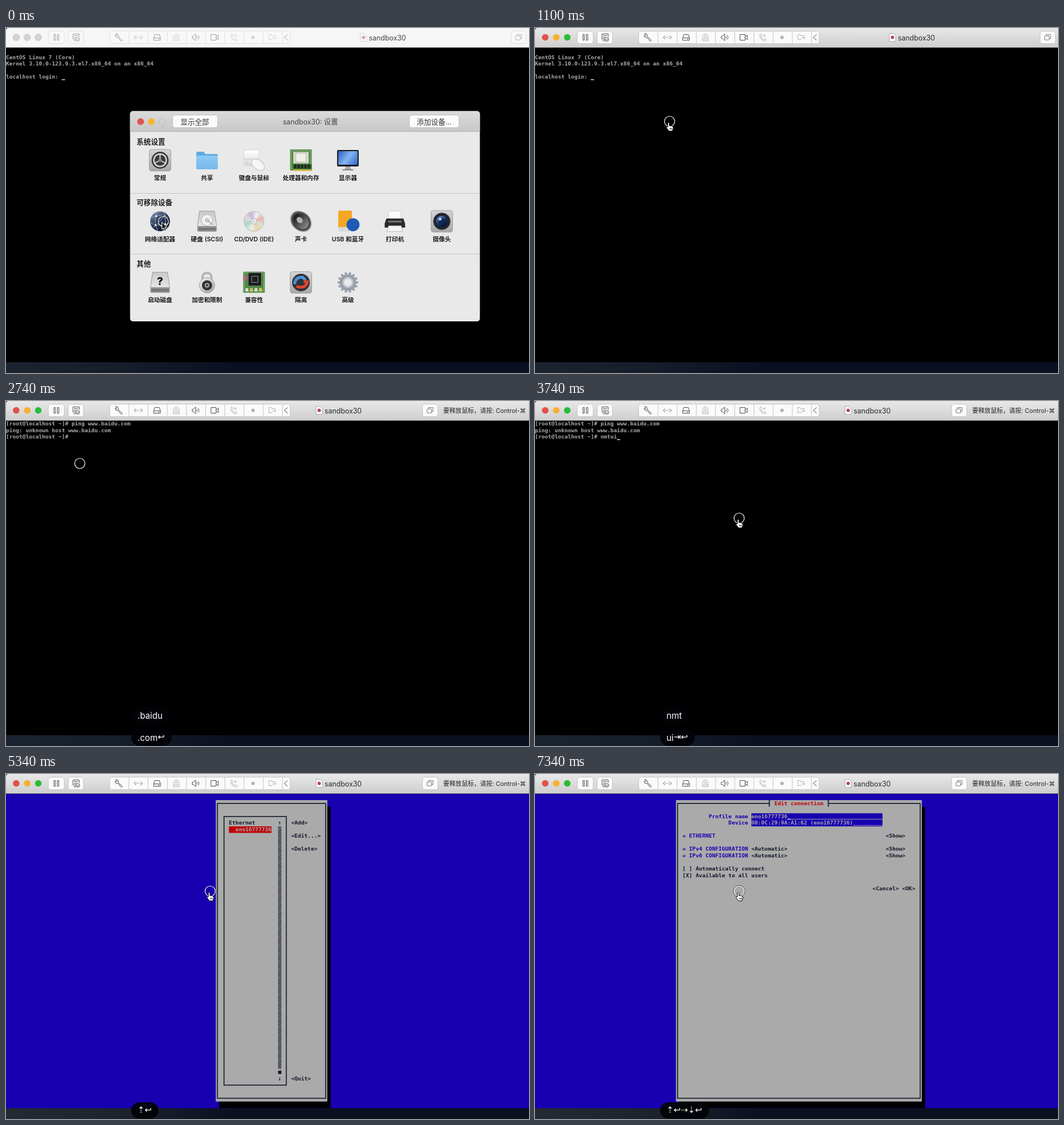
Animation of 921x608 px, one loop 8 s. Source, as an HTML page with a canvas:

```html
<!DOCTYPE html>
<html lang="zh-CN">
<head>
<meta charset="utf-8">
<style>
html, body { margin: 0; width: 100%; height: 100%; overflow: hidden; background: #000; }
canvas { display: block; }
</style>
</head>
<body>
<canvas id="stage" width="921" height="608"></canvas>
<script>
const g = document.getElementById('stage').getContext('2d');
const LOOP = 8000, CW = 5.773, CH = 11.547, TOP = 34.5;
const GRAY = '#aaa', BLUE = '#1800b0', RED = '#c00008', INK = '#101828';
const SANS = 'Inter, "Noto Sans CJK SC", "Noto Sans CJK JP", "DejaVu Sans", sans-serif';
const MONO = 'bold 9.589px "DejaVu Sans Mono", monospace';
const HOST = 'sandbox30', PROMPT = '[root@localhost ~]# ';

// ---- drawing helpers ----
function rect(x, y, w, h, fill, r = 0, line) {
  g.beginPath();
  g.roundRect(x, y, w, h, r);
  if (fill) { g.fillStyle = fill; g.fill(); }
  if (line) { g.strokeStyle = line; g.lineWidth = 1; g.stroke(); }
}
function disc(x, y, r, fill, line, width = 1) {
  g.beginPath();
  g.arc(x, y, r, 0, 7);
  if (fill) { g.fillStyle = fill; g.fill(); }
  if (line) { g.strokeStyle = line; g.lineWidth = width; g.stroke(); }
}
function path(d, fill, line, width = 1) {
  const p = new Path2D(d);
  if (fill) { g.fillStyle = fill; g.fill(p); }
  if (line) { g.strokeStyle = line; g.lineWidth = width; g.stroke(p); }
}
function text(s, x, y, size, color, align = 'left', weight = 400) {
  g.font = `${weight} ${size}px ${SANS}`;
  g.textAlign = align;
  g.textBaseline = 'alphabetic';
  g.fillStyle = color;
  g.fillText(s, x, y);
}
function ramp(x0, y0, x1, y1, ...colors) {
  const r = g.createLinearGradient(x0, y0, x1, y1);
  colors.forEach((c, i) => r.addColorStop(i / (colors.length - 1), c));
  return r;
}
function at(x, y, draw) {
  g.save();
  g.translate(x, y);
  draw();
  g.restore();
}

// ---- main window ----
const toolIcons = [
  [199, 'M-7-5L-4-7-1-4-1-1 6 5 4 7-2 0-5 0-7-3-4-3-3-5-5-7'],
  [233, 'M-4-3L-7 0-4 3M4-3L7 0 4 3M-3 0h1M-.5 0h1M2 0h1'],
  [266, 'M-6 1L-4-5H4L6 1V5H-6ZM-6 1H6M2 3h2'],
  [300, 'M-5 6V0A5 6 0 0 1 5 0V6ZM-5 3H5M-2-1A2 2 0 0 0 2-1A2 2 0 0 0-2-1', 1],
  [334, 'M-6-2H-4L0-6V6L-4 2H-6ZM2-2Q4 0 2 2M4-4Q8 0 4 4'],
  [367, 'M-6-5H3V5H-6ZM3-1L7-4V4L3 1'],
  [401, 'M-5-5L-3-6-1-3-3-1Q-1 3 2 4L4 2 6 5Q4 8 0 5-6 1-5-5M2-2L5-5M2-5V-2H5', 1],
  [435, '', 1],
  [469, 'M-6 4V-5H-2L-1-3H5V-1M-6 4H0M0 1H6L4-1M6 1L4 3', 1],
  [493, 'M3-5L-3 0 3 5']
];
function toolbar(active, captured) {
  rect(0, 0, 921, 34, active ? ramp(0, 0, 0, 34, '#e8e8e8', '#cecece') : '#f6f6f6');
  rect(0, 34, 921, 1, '#6b6b6b');
  path('M0 0H3L0 3Z', '#555');
  ['#e2504a', '#f5b02e', '#29bd36'].forEach((c, i) =>
    disc(18 + 19.4 * i, 16.5, 5.8, active ? c : '#d3d3d3', active ? null : '#c6c6c6'));
  const edge = active ? '#c4c4c4' : '#e0e0e0', face = active ? '#fafafa' : '#f8f8f8';
  const boxX = captured ? 733.5 : 889.5;
  for (const [x, w] of [[74.5, 28], [109.5, 27], [182.5, 318], [boxX, 27]]) rect(x, 5.5, w, 22, face, 4, edge);
  for (let i = 0; i < 9; i++) rect(216 + 33.8 * i, 6, 1, 21, edge);
  g.save();
  g.globalAlpha = active ? 1 : 0.5;
  const ink = '#4a4a4a', dim = '#b0b0b0';
  rect(84.5, 11.5, 2.5, 10, null, 0, ink);
  rect(90.5, 11.5, 2.5, 10, null, 0, ink);
  at(123, 16.5, () => {
    path('M6-1V-6H-5V3H0M-3-3H4M-3 0H1M-4 6H0', null, ink);
    disc(3.5, 3.5, 3.3, null, ink);
    path('M2 3.5L3.3 5 5 2.5', null, ink);
  });
  for (const [x, d, off] of toolIcons) at(x, 16.5, () => {
    if (d) path(d, null, off ? dim : ink);
    else disc(0, 0, 3, dim);
  });
  at(boxX + 13.5, 16.5, () => {
    rect(-5.5, -2.5, 8, 7, null, 1, '#777');
    path('M-3-3V-5H5V2H3', null, '#777');
  });
  const tx = captured ? 546 : 624;
  path(`M${tx} 9.5h7l4 4v10h-11z`, '#fff', '#999', 0.8);
  disc(tx + 5.5, 16.5, 3, '#b8435a');
  g.restore();
  text(HOST, tx + 15, 21.5, 12.4, active ? '#2c2c2c' : '#444');
  if (captured) text('要释放鼠标，请按: Control-⌘', 770, 20.5, 10.8, '#222');
}
function strip(light) {
  rect(0, 589, 921, 19, ramp(0, 589, 400, 608, light ? '#242a33' : '#1b2330', light ? '#1d232d' : '#161d2b', '#0a1020'));
}

// ---- console ----
function put(row, col, s, color = GRAY, back) {
  if (back) rect(col * CW, TOP + row * CH, s.length * CW, CH, back);
  g.font = MONO;
  g.textAlign = 'left';
  g.textBaseline = 'alphabetic';
  g.fillStyle = color;
  [...s].forEach((c, i) => {
    if (c !== ' ') g.fillText(c, (col + i) * CW, TOP + row * CH + 8.6);
  });
}
function caret(row, col) { rect(col * CW, TOP + row * CH + 9.6, CW, 1.6, '#ccc'); }

function frame(c0, r0, c1, r1) {
  const x = (c0 + .5) * CW, y = TOP + (r0 + .5) * CH;
  g.strokeStyle = INK;
  g.lineWidth = 1.6;
  g.strokeRect(x, y, (c1 - c0) * CW, (r1 - r0) * CH);
}
function dialog(c0, r0, c1, r1, title, col) {
  const w = (c1 - c0) * CW, h = (r1 - r0) * CH;
  rect((c0 + 1) * CW, TOP + (r0 + 1) * CH, w, h, '#000');
  rect(c0 * CW, TOP + r0 * CH, w, h, GRAY);
  frame(c0, r0, c1 - 1, r1 - 1);
  if (!title) return;
  const a = (col - 1.5) * CW, b = (col + title.length + 1.5) * CW, y = TOP + r0 * CH;
  rect(a, y, b - a, CH, GRAY);
  rect(a - 1, y, 1.8, CH, INK);
  rect(b - 1, y, 1.8, CH, INK);
  put(r0, col, title, RED);
}
function menuScreen() {
  dialog(67, 18, 94, 31, 'NetworkManager TUI', 71);
  put(20, 69, 'Please select an option', BLUE);
  put(22, 69, 'Edit a connection'.padEnd(23), GRAY, RED);
  put(23, 69, 'Activate a connection', INK);
  put(24, 69, 'Set system hostname', INK);
  put(26, 69, 'Quit', INK);
  put(28, 88, '<OK>', INK);
}
function listScreen(onEdit) {
  dialog(64, 1, 98, 47);
  frame(66, 3, 85, 44);
  put(4, 68, 'Ethernet', INK);
  put(5, 68, '  eno16777736', GRAY, onEdit ? BLUE : RED);
  put(4, 83, '↑', INK);
  put(42, 83, '■', INK);
  put(43, 83, '↓', INK);
  g.save();
  g.beginPath();
  g.rect(83 * CW, TOP + 5 * CH, CW, 37 * CH);
  g.clip();
  g.strokeStyle = INK;
  g.lineWidth = 1.1;
  g.beginPath();
  for (let y = 88; y < 530; y += 2.9) { g.moveTo(478, y + 6); g.lineTo(487, y - 3); }
  g.stroke();
  g.restore();
  put(4, 87, '<Add>', INK);
  put(6, 87, '<Edit...>', onEdit ? GRAY : INK, onEdit && RED);
  put(8, 87, '<Delete>', INK);
  put(43, 87, '<Quit>', INK);
}
function editScreen() {
  dialog(43, 1, 118, 47, 'Edit connection', 73);
  put(3, 53, 'Profile name', BLUE);
  put(4, 59, 'Device', BLUE);
  put(3, 66, 'eno16777736'.padEnd(40, '_'), GRAY, BLUE);
  put(4, 66, '00:0C:29:9A:A1:62 (eno16777736)'.padEnd(40, '_'), GRAY, BLUE);
  caret(3, 77);
  [[6, 'ETHERNET'], [8, 'IPv4 CONFIGURATION'], [9, 'IPv6 CONFIGURATION']].forEach(([row, s]) => {
    put(row, 45, '= ' + s, BLUE);
    put(row, 107, '<Show>', INK);
    if (row > 6) put(row, 66, '<Automatic>', INK);
  });
  put(11, 45, '[ ] Automatically connect', INK);
  put(12, 45, '[X] Available to all users', INK);
  put(14, 103, '<Cancel> <OK>', INK);
}
function loginScreen(t) {
  put(1, 0, 'CentOS Linux 7 (Core)');
  put(2, 0, 'Kernel 3.10.0-123.9.3.el7.x86_64 on an x86_64');
  const typed = 'root'.slice(0, t < 1400 ? 0 : t < 1550 ? 2 : t < 1690 ? 3 : 4);
  put(4, 0, 'localhost login: ' + typed);
  if (t < 1840) {
    if (!(t >= 500 && t < 650) && !(t >= 950 && t < 1100)) caret(4, 17 + typed.length);
    return;
  }
  put(5, 0, 'Password:');
  if (t < 2440) {
    if (t < 2140) caret(5, 10);
    return;
  }
  put(6, 0, 'Last login: Wed Mar 15 10:22:41 on tty1');
  put(7, 0, PROMPT + 'clear');
  caret(7, 25);
}
function shellScreen(t) {
  if (t < 2740) {
    put(0, 0, PROMPT);
    caret(0, 20);
    return;
  }
  put(0, 0, PROMPT + 'ping www.baidu.com');
  put(1, 0, 'ping: unknown host www.baidu.com');
  put(2, 0, PROMPT + (t < 3740 ? '' : 'nmtui'));
  if (t >= 3740) caret(2, 25);
}

// ---- settings window ----
function tile() { rect(-19, -19, 38, 38, ramp(0, -19, 0, 19, '#d4d4d4', '#a8a8a8'), 4, '#a0a0a0'); }
function drive() {
  path('M-13-18H13L17 9H-17Z', ramp(0, -18, 0, 9, '#c9c9c9', '#e6e6e6'), '#999');
  rect(-17, 9, 34, 9, '#8d8d8d', 2);
  for (let i = -14; i < 14; i += 3) rect(i, 12, 1.5, 3, '#555');
}
function gear(r, teeth, color) {
  g.strokeStyle = color;
  g.lineWidth = 4;
  g.beginPath();
  for (let i = 0; i < teeth; i++) {
    const a = i * 2 * Math.PI / teeth, c = Math.cos(a), s = Math.sin(a);
    g.moveTo(c * r, s * r);
    g.lineTo(c * (r + 4), s * (r + 4));
  }
  g.stroke();
  disc(0, 0, r - 2, null, color, 5);
}
function board() {
  rect(-19, -19, 38, 37, '#4c8a41', 1);
  rect(-17, -17, 34, 32, null, 0, '#8dbb78');
}
const icons = {
  常规() {
    tile();
    disc(0, 0, 15, '#3a3a3a');
    disc(0, 0, 11, null, '#d8d8d8', 2.5);
    path('M0 0V-10M0 0L9 5M0 0L-9 5', null, '#d8d8d8', 2);
    disc(0, 0, 3, '#888');
  },
  共享() {
    path('M-19-12Q-19-15-16-15H-6L-3-11H16Q19-11 19-8V14H-19Z', '#5fabe2');
    rect(-19, -8, 38, 24, ramp(0, -8, 0, 16, '#8fcaf4', '#73b9ec'), 2);
  },
  键盘与鼠标() {
    rect(-18, -18, 27, 28, ramp(0, -18, 0, 10, '#fff', '#d9d9d9'), 3, '#d4d4d4');
    path('M-15 2L-10 7M-10 2L-15 7M-17-2H8', null, '#c4c4c4');
    at(7, 8, () => {
      g.rotate(.65);
      g.beginPath();
      g.ellipse(0, 0, 13, 8, 0, 0, 7);
      g.fillStyle = '#f6f6f6';
      g.fill();
      g.strokeStyle = '#bbb';
      g.stroke();
    });
  },
  处理器和内存() {
    board();
    rect(-14, -15, 28, 21, '#d5dac9', 1, '#718068');
    rect(-9, -12, 18, 15, '#eef0e6', 1, '#b5bca8');
    rect(-14, 7, 33, 12, '#2e6d2c');
    for (let i = 0; i < 5; i++) rect(-12 + 6 * i, 8, 4, 6, '#222');
    rect(-14, 16, 33, 3, '#d3b44a');
  },
  显示器() {
    rect(-19, -18, 38, 29, '#15171b', 2);
    rect(-17, -16, 34, 24, ramp(-17, -16, 17, 8, '#2b5fc0', '#86b5f1', '#2f64c4'));
    path('M-4 11H4L6 17H-6Z', '#aaa');
    rect(-10, 16, 20, 2, '#888', 1);
  },
  网络适配器() {
    disc(0, 0, 17.5, ramp(-12, -15, 10, 17, '#7388a8', '#26324f', '#121a30'));
    path('M-14-7Q0-14 14-7M-17 3Q0 11 17 3M-5-16Q-13 0-4 16M6-16Q14 0 5 16M-12 11L11-12', null, '#92a3c0');
    for (const [x, y] of [[-7, -9], [8, -9], [-8, 7], [9, 5]]) disc(x, y, 1.6, '#fff');
  },
  '硬盘 (SCSI)'() {
    drive();
    disc(0, -2, 10, '#f0f0f0', '#b5b5b5');
    disc(0, -2, 3, '#d0d0d0', '#aaa');
    path('M2-1L10 6', null, '#aaa', 2);
  },
  'CD/DVD (IDE)'() {
    const c = g.createConicGradient(.4, 0, 0);
    ['#ddd', '#e7d7a0', '#eee', '#a8d6c8', '#ddd', '#c9b5dd', '#f2f2f2', '#e5b5a8', '#ddd']
      .forEach((v, i) => c.addColorStop(i / 8, v));
    disc(0, 0, 17.5, c, '#bbb');
    disc(0, 0, 5, '#eee', '#aaa');
    disc(0, 0, 2, '#ccc');
  },
  声卡() {
    g.rotate(.75);
    g.scale(1, .8);
    disc(0, 0, 20, '#4a4a4a', '#b0b0b0', 2);
    disc(0, 0, 15, ramp(-15, 0, 15, 0, '#181818', '#8a8a8a'));
    disc(-3, 0, 6, '#b0b0b0');
  },
  'USB 和蓝牙'() {
    rect(-17, -19, 24, 35, '#f5a623', 2);
    rect(-17, 10, 24, 8, '#d9d9d9', 1);
    disc(9, 6, 11.5, '#1d5bb5');
  },
  打印机() {
    rect(-11, -18, 22, 18, '#fafafa', 0, '#ccc');
    path('M-15-5H15L18 4V11H-18V4Z', '#2a2a2a');
    rect(-12, -1, 24, 3, '#777');
    path('M-11 8H11L14 18H-14Z', '#f4f4f4', '#bbb');
  },
  摄像头() {
    tile();
    disc(0, 0, 15, '#20242c', '#666');
    disc(0, 0, 10, ramp(-6, -9, 6, 9, '#5d8fd0', '#143063', '#0a1530'));
    disc(0, 0, 5, '#122650');
    disc(-3, -4, 2.5, '#b8d4f4');
  },
  启动磁盘() {
    drive();
    text('?', 0, 5, 19, '#111', 'center', 800);
  },
  加密和限制() {
    path('M-8 0V-9A8 8 0 0 1 8-9V0', null, '#b5b5b5', 4);
    disc(0, 5, 13.5, ramp(-10, -8, 10, 18, '#f2f2f2', '#a5a5a5'), '#999');
    disc(0, 5, 9, '#343434');
    disc(0, 5, 4, '#aaa');
    disc(0, 5, 2, '#333');
  },
  兼容性() {
    board();
    rect(-10, -17, 23, 23, '#1a1c1e', 1, '#777');
    rect(-4, -11, 11, 11, null, 0, '#999');
    rect(-18, -12, 5, 9, '#c75b87');
    for (let i = 0; i < 4; i++) rect(-15 + 8 * i, 10, 5, 6, i % 2 ? '#d9c267' : '#ddd');
  },
  隔离() {
    tile();
    disc(0, 0, 15.5, '#30343c');
    path('M-11 3Q-10-10 3-9L8-4', null, '#4b93d8', 5);
    path('M-8 7Q8 12 11-1L5-2', null, '#e0452f', 5);
  },
  高级() {
    gear(14, 14, '#979faa');
    disc(0, 0, 8, null, '#b8c0cc', 2);
  }
};
const sections = [['系统设置', 5], ['可移除设备', 7], ['其他', 5]];
function settings() {
  rect(218.5, 146.5, 616, 370.5, '#e9e9e9', 5);
  rect(218.5, 146.5, 616, 35.5, ramp(0, 147, 0, 182, '#dadada', '#c8c8c8'), [5, 5, 0, 0]);
  rect(218.5, 182, 616, 1, '#b5b5b5');
  disc(237, 165, 6, '#de544f');
  disc(256, 165, 6, '#f8b42e');
  disc(275, 165, 5.5, '#d2d2d2', '#bcbcbc');
  rect(293.5, 153.5, 79, 22, '#fbfbfb', 4, '#c4c4c4');
  rect(710.5, 153.5, 87, 22, '#fbfbfb', 4, '#c4c4c4');
  text('显示全部', 332.5, 169.5, 12.6, '#333', 'center');
  text('添加设备...', 754, 169.5, 12.6, '#333', 'center');
  text(HOST + ': 设置', 536, 169.5, 12.4, '#444', 'center');
  rect(219, 291, 615, 1, '#c6c6c6');
  rect(219, 398, 615, 1, '#c6c6c6');
  const names = Object.keys(icons);
  let n = 0;
  sections.forEach(([title, count], k) => {
    const y = 107.7 * k;
    text(title, 230, 204.5 + y, 12.6, '#222', 'left', 600);
    for (let i = 0; i < count; i++) {
      const name = names[n++], x = 271.3 + 82.7 * i;
      at(x, 233 + y, icons[name]);
      text(name, x, 268 + y, 10.7, '#1a1a1a', 'center', 600);
    }
  });
}

// ---- key display and pointer ----
function pill(s, y) {
  const [, word, keys] = s.match(/^([\w.]*)(.*)$/);
  const keyFont = '15px "DejaVu Sans", sans-serif';
  g.font = `15.2px ${SANS}`;
  const w = g.measureText(word).width;
  g.font = keyFont;
  rect(220.5, y, w + g.measureText(keys).width + 23, 29, 'rgba(2,4,8,.95)', 14.5);
  text(word, 231.5, y + 20, 15.2, '#fff');
  g.font = keyFont;
  g.fillText(keys, 231.5 + w, y + 18.5);
}
const keySteps = [
  [0], [1400, 'ro'], [1550, 'root'], [1840, 'root↩'], [2440, 'clear↩'],
  [2740, '.com↩', '.baidu'], [3740, 'ui⇥↩', 'nmt'], [4890, 'ui⇥↩'],
  [5040, '⇡'], [5340, '⇡↩'], [6340, '⇡↩⇢⇣'], [7340, '⇡↩⇢⇣↩']
];
const pointerSteps = [
  [0, 277, 341, 'arrow'], [800, 257, 253, 'arrow'], [950, 237, 164.5, 'arrow'],
  [1100, 237, 164.5, 'hand'], [1250, 130, 110], [3740, 359.5, 206.5, 'hand']
];
const shapes = {
  arrow: 'M-2.5 1V13.5L.5 11 3 16.5 5.2 15.5 2.8 10.2H6.8Z',
  hand: 'M-3.2 4C-3.2 1.5-.4 1.5-.4 4V8L1 7.6 2.3 8.4 3.6 8 4.8 9.1 6.4 9.5V13L4.8 17H-1.2L-5.4 11.3C-6.4 9.6-4.3 8.8-3.2 10.2Z'
};
const stepAt = (steps, t) => steps.findLast(s => s[0] <= t);

function pointer(t) {
  const [, x, y, shape] = stepAt(pointerSteps, t);
  at(x, y, () => {
    disc(0, 0, 10, null, 'rgba(0,0,0,.8)', .9);
    disc(0, 0, 9, null, '#fff', 1.2);
    if (!shape) return;
    const arrow = shape === 'arrow';
    path(shapes[shape], arrow ? '#111' : '#fff', arrow ? '#fff' : '#000');
    if (!arrow) path('M.6 11.5V14.5M2.4 11.5V14.5M4.2 11.5V14.5', null, '#000', .8);
  });
}

function draw(now) {
  const t = now % LOOP, tui = t >= 4740;
  rect(0, 0, 921, 608, '#000');
  if (tui) rect(0, 35, 921, 554, BLUE);
  else if (t >= 1100) rect(0, 35, 1, 554, '#0a1128');
  if (t < 2590) loginScreen(t);
  else if (!tui) shellScreen(t);
  else if (t < 5340) menuScreen();
  else if (t < 7340) listScreen(t >= 6340);
  else editScreen();
  strip(tui);
  toolbar(t >= 1100, t >= 1250);
  if (t < 1100) settings();
  const [, low, high] = stepAt(keySteps, t);
  if (high) pill(high, 540);
  if (low) pill(low, 578.5);
  pointer(t);
}
const start = performance.now();
function tick() {
  draw(performance.now() - start);
  requestAnimationFrame(tick);
}
tick();
</script>
</body>
</html>
```
